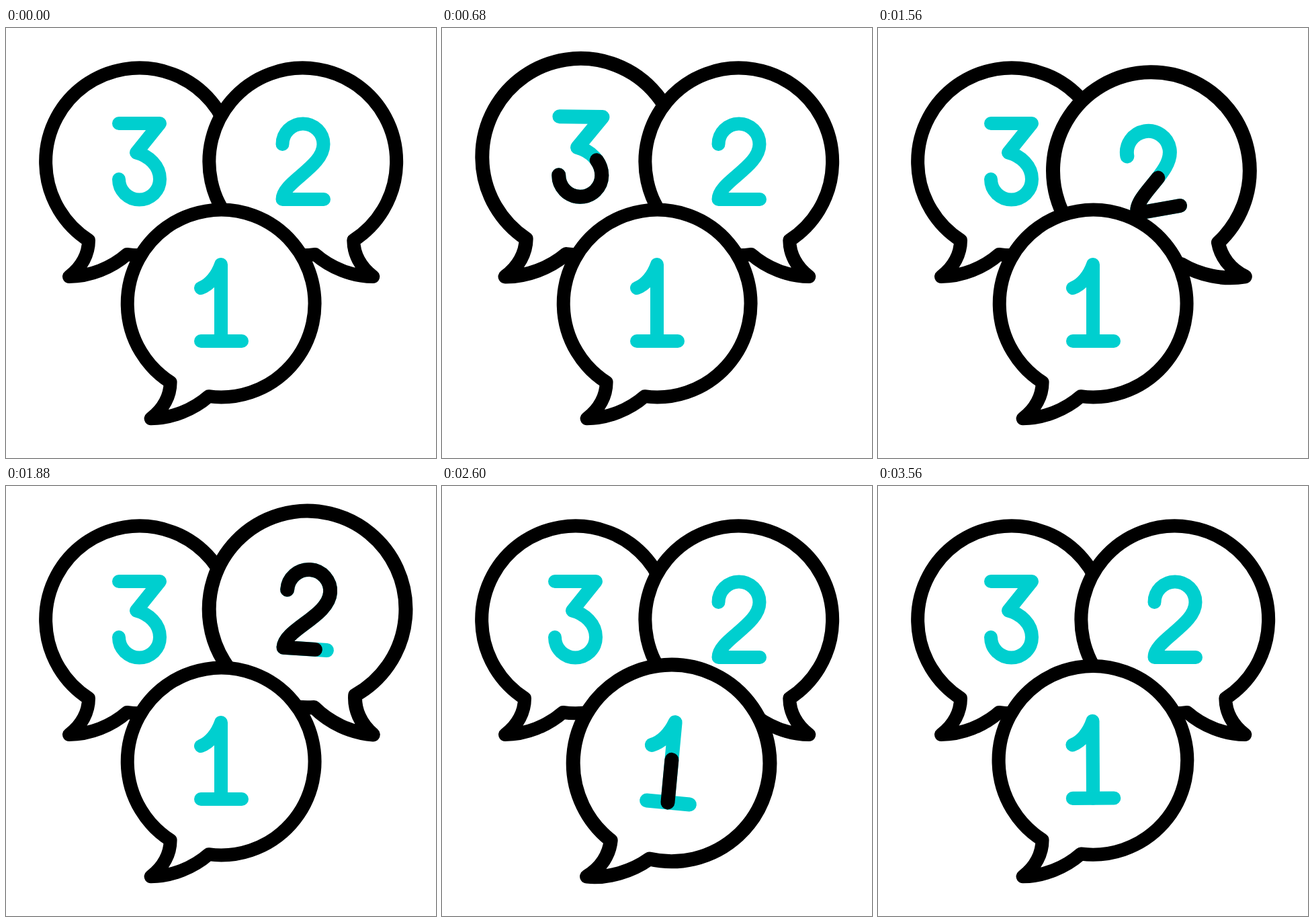
An HTML page that plays this animation: 640 px wide and 640 px high, repeating every 3600 ms.

```html
<!DOCTYPE html>
<html lang="en">
<head>
<meta charset="utf-8">
<title>Numbered speech bubbles</title>
<style>
  html, body { margin: 0; width: 100%; height: 100%; overflow: hidden; background: #fff; }
  svg { display: block; width: 100vw; height: 100vh; }
  path { stroke-width: 20; stroke-linecap: round; stroke-linejoin: round; fill: none; }
  .shell { stroke: #000; fill: #fff; }
  .digit { stroke: #00cfcf; }
  .ink { stroke: #000; }
</style>
</head>
<body>
<svg id="stage" viewBox="0 0 640 640"></svg>
<script>
const LOOP = 3600, STEP = 40, GROWN = 1.05;
const SHELL = 'M123 316C123 336 113 356 94 370C125 370 157 357 180 337' +
  'A139.4 139.4 0 1 0 123 316Z';

// swing: [time, degrees] keys; ink: start, fully black, fully clear
const bubbles = [
  {
    place: '', pivot: [94, 370],
    parts: ['M168 142H229L194 185.5C212 190 229 205 229 225A30.5 30.5 0 0 1 168 225'],
    swing: [[0, 0], [250, -10.4], [520, 10], [780, -5], [1040, 3.5], [1270, -2.4], [1520, 0]],
    ink: [0, 442, 884]
  },
  {
    place: 'matrix(-1 0 0 1 640.3 0)', pivot: [546, 370],
    parts: ['M473 255H411.5C411.5 229 472.5 207 472.5 173A30.5 30.5 0 0 0 411.5 173'],
    swing: [[1078, 0], [1325, 12.4], [1570, -11], [1830, 6.2], [2080, -6], [2325, 3.4], [2570, 0]],
    ink: [1335, 1810, 2272]
  },
  {
    place: 'translate(121.6 211.2)', pivot: [216, 581],
    parts: ['M320 466V352C314 369 303 382 290 387', 'M290 466H351'],
    swing: [[2125, 0], [2365, -10.3], [2640, 8], [2880, -5.2], [3120, 3.5], [3365, -2.3], [3590, 0]],
    ink: [2435, 2915, 3390]
  }
];

const stage = document.getElementById('stage');

function add(parent, tag, attrs) {
  const el = document.createElementNS('http://www.w3.org/2000/svg', tag);
  for (const name in attrs) el.setAttribute(name, attrs[name]);
  return parent.appendChild(el);
}

const clamp = x => Math.max(0, Math.min(1, x));
const ramp = (t, a, b) => clamp((t - a) / (b - a));
const smooth = x => x * x * (3 - 2 * x);

function keyed(keys, t) {
  let value = keys[0][1];
  for (let i = 1; i < keys.length; i++) {
    const [t0, v0] = keys[i - 1], [t1, v1] = keys[i];
    if (t >= t0) value = v0 + (v1 - v0) * ramp(t, t0, t1);
  }
  return value;
}

for (const b of bubbles) {
  b.group = add(stage, 'g', {});
  add(b.group, 'path', { class: 'shell', d: SHELL, transform: b.place });
  for (const d of b.parts) add(b.group, 'path', { class: 'digit', d });
  b.total = 0;
  b.strokes = b.parts.map(d => {
    const el = add(b.group, 'path', { class: 'ink', d });
    const stroke = { el, from: b.total, length: el.getTotalLength() };
    b.total += stroke.length;
    return stroke;
  });
}

function pose(b, t) {
  const [x, y] = b.pivot, k = b.swing;
  const grow = ramp(t, k[0][0], k[1][0]) - ramp(t, k[5][0], k[6][0]);
  const scale = 1 + (GROWN - 1) * grow;
  b.group.setAttribute('transform',
    `translate(${x} ${y}) rotate(${keyed(k, t)}) scale(${scale}) translate(${-x} ${-y})`);
}

// A black stroke runs along the digit: its head first, then its tail.
function paintInk(b, t) {
  const [start, full, clear] = b.ink;
  const head = smooth(ramp(t, start, full)) * b.total;
  const tail = smooth(ramp(t, full, clear)) * b.total;
  for (const { el, from, length } of b.strokes) {
    const a = Math.max(0, tail - from);
    const size = Math.min(length, head - from) - a;
    el.style.visibility = size > 0.01 ? 'visible' : 'hidden';
    if (size > 0.01) {
      el.setAttribute('stroke-dasharray', `${size} 2000`);
      el.setAttribute('stroke-dashoffset', -a);
    }
  }
}

function draw(time) {
  const t = Math.floor((time % LOOP) / STEP) * STEP;
  for (const b of bubbles) {
    pose(b, t);
    paintInk(b, t);
  }
}

function tick() {
  draw(performance.now());
  requestAnimationFrame(tick);
}
draw(0);
requestAnimationFrame(tick);
</script>
</body>
</html>
```
